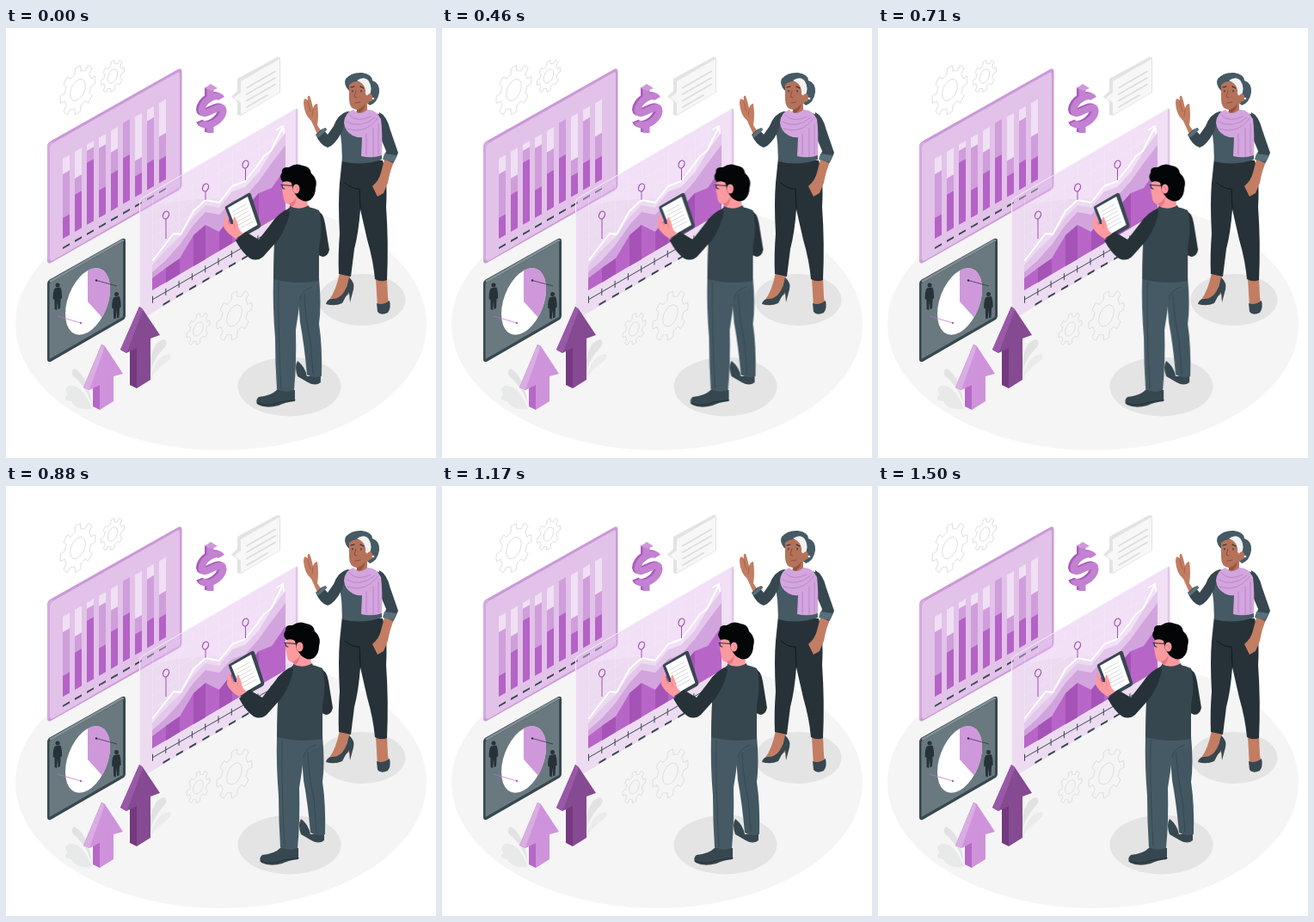
Recreate the animation shown at these times as an HTML page without scripts. Size 500x500 px, loop 1540 ms.

```html
<!DOCTYPE html>
<html lang="en">
<head>
<meta charset="utf-8">
<title>Business analytics</title>
<style>
  html, body { margin: 0; width: 100%; height: 100%; overflow: hidden; background: #fff; }
  svg { display: block; width: 100%; height: 100%; }
  .line { fill: none; stroke-linecap: round; stroke-linejoin: round; }
  .gear { fill: none; stroke: #dedede; }
  .dark { fill: #263238; }
  .slate { fill: #37474f; }
  .steel { fill: #455a64; }
  .tan { fill: #c27d62; }
  .face { fill: #b5725a; }
  .pink { fill: #fb9a9f; }
  /* 1.5 s shake, then a short rest to close the 1.54 s loop */
  #man { animation: shake 1540ms ease -12ms infinite; }
  @keyframes shake {
    0%, 97.4%, 100% { transform: translateX(0); }
    9.74%, 87.66% { transform: translateX(-1px); }
    19.48%, 77.92% { transform: translateX(2px); }
    29.22%, 48.7%, 68.18% { transform: translateX(-4px); }
    38.96%, 58.44% { transform: translateX(4px); }
  }
</style>
</head>
<body>
<svg viewBox="0 0 500 500">
  <defs>
    <path id="tooth" vector-effect="non-scaling-stroke" d="M.702-.291A.76.76 0 0 1 .741-.171L.988-.156A1 1 0 0 1 .988.156L.741.171A.76.76 0 0 1 .702.291"/>
    <g id="pair"><use href="#tooth"/><use href="#tooth" transform="rotate(45)"/></g>
    <g id="half"><use href="#pair"/><use href="#pair" transform="rotate(90)"/></g>
    <g id="gear">
      <use href="#half"/><use href="#half" transform="rotate(180)"/>
      <circle r=".43" vector-effect="non-scaling-stroke"/>
    </g>
    <g id="person">
      <circle cy="-13" r="2.5"/>
      <path d="M-3-9.500L3-10.500Q5-9 5.200 2L3.600 3L3 14L.6 15L0 5L-.8 16L-3.400 15L-3.600 4L-5.400 3Q-5.500-7-3-9.500Z"/>
    </g>
    <pattern id="grid" width="15.5" height="15.5" patternUnits="userSpaceOnUse">
      <path d="M0 15.5V0H15.500" fill="none" stroke="#fff"/>
    </pattern>
  </defs>

  <ellipse cx="250" cy="344.500" rx="239" ry="146.500" fill="#f5f5f5"/>
  <g fill="#e4e4e4">
    <ellipse cx="329.500" cy="417" rx="60" ry="34.500"/>
    <ellipse cx="414" cy="316" rx="50.500" ry="30"/>
  </g>

  <g class="gear">
    <use href="#gear" transform="matrix(20.500 -11.500 0 27 83.500 72)"/>
    <use href="#gear" transform="matrix(13.500 -7.600 0 17.500 124 56)"/>
    <use href="#gear" transform="matrix(13.500 -7.600 0 17.500 223.500 350)"/>
    <use href="#gear" transform="matrix(20.500 -11.500 0 27 265.500 334.500)"/>
  </g>

  <!-- speech bubble -->
  <path d="M269 59L315 34Q319 33 319 36V75L273 102L269 101V85L262 80L269 73Z" fill="#e3e3e3"/>
  <path d="M273 62L318 36V75L273 101V87L265 81L273 75Z" fill="#f7f7f7"/>
  <path class="line" d="M280 69.500L313 50.500M280 77L313 58M280 84.500L313 65.500M280 92L304 78" stroke="#dedede" stroke-width="2"/>

  <!-- bar chart panel -->
  <path d="M48 137Q48 134 51 132L200 48Q204 46 204.500 50V183Q204 186 202 188L54 272Q48 276 48 270Z" fill="#cb99d8"/>
  <path d="M51 139Q51 136 54 134L199 52Q202 50 202 54V182Q202 185 199 187L55 270Q51 272 51 268Z" fill="#e2c2e9"/>
  <path class="line" d="M49.500 269V138Q50 135 53 133" stroke="#d7abe1" stroke-width="2.500"/>
  <g class="line" style="stroke-linecap:butt" transform="matrix(1 -.577 0 1 66 243)" stroke-width="8">
    <path d="M4 2v-93m14 93v-93m14 93v-93m14 93v-93m14 93v-93m14 93v-93m14 93v-93m14 93v-93m14 93v-93" stroke="#f0e0f4"/>
    <path d="M4 2v-75m14 75v-62m14 62v-86m14 86v-81m14 81v-68m14 68v-94m14 94v-42m14 42v-80m14 80v-54" stroke="#cf9edb"/>
    <path d="M4 2v-24m14 24v-43m14 43v-72m14 72v-32m14 32v-43m14 43v-53m14 53v-24m14 24v-31m14 31v-27" stroke="#b462c6"/>
    <path d="M0 13H122" stroke="#37474f" stroke-width="2.200" stroke-dasharray="8 6"/>
  </g>

  <!-- pie panel -->
  <path d="M48 297Q48 295 50 293L135 245Q139 244 139 247V335Q139 337 137 339L52 388Q48 389 48 385Z" class="slate"/>
  <path d="M50.500 297L136 248.500V336L50.500 385Z" fill="#69797f"/>
  <path d="M50 294L135 245.500L138 247L52 296Z" fill="#829096"/>
  <g transform="matrix(26 -14.500 0 36 95 318)">
    <circle r="1" fill="#fff"/>
    <path d="M0 0V-1A1 1 0 0 1 .64.77Z" fill="#cf98db"/>
  </g>
  <g class="dark"><use href="#person" x="60" y="312"/><use href="#person" x="128.500" y="322.500"/></g>
  <path d="M105 293.500L129 300" stroke="#263238" stroke-width=".7"/><circle cx="105" cy="293.500" r="1.200" class="dark"/>
  <path d="M60 335L87 343" stroke="#b870c8" stroke-width=".7"/><circle cx="87" cy="343" r="1.200" fill="#b462c6"/>

  <!-- glass chart panel -->
  <path d="M155 203Q155 200 158 198L335 95Q339 93 339.500 97V228Q339 231 337 233L160 337Q155 340 155 335Z" fill="#e0bbea" opacity=".45"/>
  <path d="M338 95V229L335 233" class="line" stroke="#e2c5ea" stroke-width="2.500"/>
  <path d="M155.500 335V203Q155.500 200 158 198L335 95" class="line" stroke="#f7effa"/>
  <rect width="155" height="108.500" y="-108.500" transform="matrix(1 -.577 0 1 170 305)" fill="url(#grid)" opacity=".35"/>
  <path d="M170 276L186 258L202 243L218 220L232 206L248 209L263 190L278 185L294 168L309 143L325 122V214L170 305Z" fill="#e4c8eb"/>
  <path d="M170 284L186 270L202 252L218 229L232 214L248 217L263 201L278 196L294 178L309 157L325 136V214L170 305Z" fill="#d2a4dd"/>
  <path d="M170 291L186 279L202 268L218 241L232 229L248 237L263 218L278 210L294 192L309 186L325 163V214L170 305Z" fill="#b766c8"/>
  <path d="M186 279L202 268V286L186 296ZM218 241L232 229V269L218 277ZM248 237L263 218V250L248 259ZM278 210L294 192V232L278 242Z" fill="#a553b7"/>
  <g class="line" stroke="#fff" stroke-width="2">
    <path d="M171 270L187 249L195 239L203 240L218 213L232 200L248 203L263 184L278 178L293 159L300 149L308 143L321 117"/>
    <path d="M315 118L322 114L323 122"/>
  </g>
  <g fill="none" stroke="#a04db4">
    <path d="M186 222V245M232 190V200M278.500 163V177"/>
    <g stroke-width="1.200">
      <ellipse cx="186" cy="217.500" rx="3.300" ry="4.600" transform="rotate(22 186 217.500)"/>
      <ellipse cx="232" cy="185.500" rx="3.300" ry="4.600" transform="rotate(22 232 185.500)"/>
      <ellipse cx="278.500" cy="158.500" rx="3.300" ry="4.600" transform="rotate(22 278.500 158.500)"/>
    </g>
  </g>
  <g transform="matrix(1 -.577 0 1 170 316)" fill="none" stroke="#37474f">
    <path d="M0 0H155" stroke-width=".9"/>
    <path d="M0 0H156" stroke-width="8" stroke-dasharray="1 14.300"/>
    <path d="M12.500 13H150" stroke-width="2.300" stroke-dasharray="8 7.300"/>
  </g>

  <!-- dollar sign -->
  <g class="line" style="stroke-linecap:butt" stroke-width="8">
    <g stroke="#a85bba">
      <path id="ess" d="M248 81C243 73 225 84 225 95C226 106 250 83 250 95C250 107 229 118 225 108"/>
      <path id="stem" d="M235 69V81M235 109V121"/>
    </g>
    <g stroke="#c381d1" transform="translate(2.500 1)"><use href="#ess"/><use href="#stem"/></g>
  </g>
  <path d="M231 70L238 65L246 70L239 73Z" fill="#cf98db"/>

  <!-- foliage and arrows -->
  <g fill="#e2e2e2">
    <path d="M101 444Q95 402 79 396Q73 402 82 408Q98 424 101 444Z"/>
    <path d="M100 443Q89 414 73 416Q66 421 72 426Q64 432 76 434Q81 445 100 443Z" fill="#e7eae8"/>
    <path d="M166 408Q167 364 184 362Q190 366 182 374Q170 386 166 408Z"/>
    <path d="M167 409Q174 380 190 379Q195 382 186 389Q174 398 167 409Z" fill="#ebebeb"/>
  </g>
  <path d="M111 368L115 370L97 421L90 418ZM101 418L109 414V444L101 440Z" fill="#b668c7"/>
  <path d="M111 368L90 418L97 421L115 371Z" fill="#d9aee3"/>
  <path d="M115 370L136 402L125 405V434L109 444V415L97 421Z" fill="#cf93db"/>
  <path d="M155 324L159 327L140 378L133 374ZM144 375L152 371V419L144 415Z" fill="#75397f"/>
  <path d="M155 324L133 374L140 378L159 327Z" fill="#9a58a9"/>
  <path d="M159 327L179 357L168 361V409L152 419V372L140 378Z" fill="#854a91"/>

  <!-- woman -->
  <g id="woman">
    <path class="tan" d="M388 284L401 286L396 300L400 309L385 317L375 317Q384 306 388 284ZM430 291H443L444 313L446 325L432 325Z"/>
    <path class="slate" d="M399 290Q406 296 404 304L400 319L399 307Q394 313 391 320Q382 324 372 321Q373 316 378 315Q390 316 396 301ZM431 320Q438 323 446 317Q448 326 444 331Q436 335 432 330Z"/>
    <path class="dark" d="M391 151L438 154Q444 174 442 208Q445 250 443 293Q436 296 429 292Q427 270 420 246L412 211Q410 238 405 257L401 289L387 286Q386 264 388 239Q386 203 388 180Z"/>
    <path d="M394 180Q403 188 411 187L412 210" class="line" stroke="#10181c"/>
    <path class="tan" d="M441 149L453 152Q447 163 444 180L439 192L432 196L429 190L426 184Q434 177 436 168Z"/>
    <path class="steel" d="M397 97Q388 103 388 116Q391 135 391 155Q413 161 437 153L436 100Z"/>
    <path class="slate" d="M434 98Q443 102 447 119L456 145Q453 153 450 157L439 152L442 143L434 124Z"/>
    <path d="M440 146L454 148L451 156L438 153Z" fill="#587079"/>
    <path class="tan" d="M370 125L362 113Q364 102 362 88Q359 88 357 93Q355 84 353 79Q350 78 351 84Q346 79 346 88Q347 101 355 108L364 128Z"/>
    <path d="M351 86L354 97M357 95L356 102" class="line" stroke="#985743" stroke-width=".7"/>
    <path class="slate" d="M397 97Q386 100 381 114L374 124L368 117L360 124Q366 137 374 139Q382 137 391 120Z"/>
    <path d="M363 125L371 118" class="line" stroke="#587079" stroke-width="4"/>
    <path class="steel" d="M398 72Q392 65 395 59Q402 51 414 52Q426 54 426 61Q435 64 434 75Q432 87 423 90L414 82Z"/>
    <path class="face" d="M399 66Q407 59 416 64L425 79Q424 86 420 88L420 101Q413 105 407 99L408 95Q399 94 399 83Z"/>
    <path d="M408 95Q413 94 418 88Q416 98 409 99Z" fill="#945540"/>
    <path d="M408 61Q417 55 422 62Q427 70 422 80L418 77Q419 65 408 61Z" fill="#f2f2f2"/>
    <ellipse cx="423" cy="81" rx="3.200" ry="4.500" class="face"/><circle cx="427" cy="82" r="1.300" fill="#fff"/>
    <g class="line" stroke="#263238" stroke-width="1.200">
      <path d="M401 69L405 68M412 68L416 70M403 72.500V74M413 72.500V74"/>
      <path d="M407 73L405 80L408 81M406 87Q409 87 412 86" stroke="#8b4638" stroke-width=".9"/>
    </g>
    <path d="M404 95Q394 98 393 110Q394 120 403 125Q409 128 414 127L413 149Q426 152 437 148Q438 121 436 106Q430 94 420 95Q411 103 404 95Z" fill="#d3a5de"/>
    <path d="M399 101Q408 111 424 103M396 109Q412 118 429 104M397 117Q418 124 432 105M419 123V148M427 117V149M433 112V147" class="line" stroke="#b77dc5" stroke-width=".8"/>
  </g>

  <!-- man -->
  <g id="man">
    <path class="slate" d="M339 387Q348 394 350 405L366 404V412Q360 417 351 412L339 405Q335 394 339 387Z"/>
    <path class="slate" d="M316 420L336 421V434Q325 435 317 439Q303 443 293 438Q289 433 294 429Q308 428 316 420Z"/>
    <path d="M292 436Q306 441 319 435L336 432.500" class="line" stroke="#263238" stroke-width="1.200"/>
    <path d="M338 292L364 291Q367 323 364 344Q368 370 367 405Q358 408 350 403Q347 369 342 342Z" fill="#425761"/>
    <path class="steel" d="M311 290H364Q365 302 358 305Q346 305 342 315Q340 333 337 351Q338 391 335 421Q325 425 315 420Q313 390 313 360Q310 325 311 290Z"/>
    <path d="M317 296Q316 350 320 419M342 315Q343 306 356 301M347 310Q348 338 354 364L357 402" class="line" stroke="#33464f" stroke-width=".8"/>
    <path class="dark" d="M360 211Q369 214 371 227L376 258Q374 266 368 266L361 263Z"/>
    <path class="slate" d="M329 209Q345 204 364 212Q369 230 364 255V294Q338 299 311 292Q311 260 313 238Z"/>

    <!-- tablet -->
    <path class="slate" d="M256 207L281 192.500Q284 190.500 285 193.500L296 228Q297 231 294 233L272 245Q269 246 268 243L255 210Q254 208 256 207Z"/>
    <path d="M258 209L281 196L292.500 229L271 241.500Z" fill="#fff"/>
    <path d="M263 214L279 205M264 218L281 209M266 222L282 213M267 226L284 217M269 230L285 221M270 234L287 225" class="line" stroke="#cdcdcd" stroke-width=".8"/>
    <path class="pink" d="M256 216Q253 222 253 231Q257 239 267 245L276 239Q270 235 270 229L266 219Q264 220 264 228L261 228Q258 224 256 216Z"/>
    <path d="M258 225L261 230M265 228L266 233" class="line" stroke="#de7c85" stroke-width=".7"/>
    <path class="dark" d="M331 209Q317 214 308 228L294 246L279 237L267 247Q275 262 284 268Q292 272 299 266L316 247Q328 230 331 209Z"/>

    <path class="pink" d="M323 176L321 188L323 199Q324 205 331 205L330 210Q341 215 351 209L350 190L341 176Z"/>
    <path d="M329 204Q335 203 338 196Q337 207 331 208Z" fill="#e47984"/>
    <path class="slate" d="M330 207Q341 213 352 206L354 212Q340 219 329 213Z"/>
    <path d="M322 179Q317 174 321 168Q320 161 329 162Q337 156 345 160Q354 161 355 169Q363 176 360 186Q360 195 354 200Q347 204 339 197L334 190L332 180Q328 177 322 179Z" fill="#030506"/>
    <ellipse cx="337.500" cy="187" rx="4" ry="5.500" class="pink"/>
    <path d="M336 185Q339 184 339 189" class="line" stroke="#de7c85" stroke-width=".8"/>
    <path d="M320 182.500L334 183.500M321 183Q321 187 324 187" class="line" stroke="#263238" stroke-width="1.200"/>
  </g>
</svg>
</body>
</html>
```
